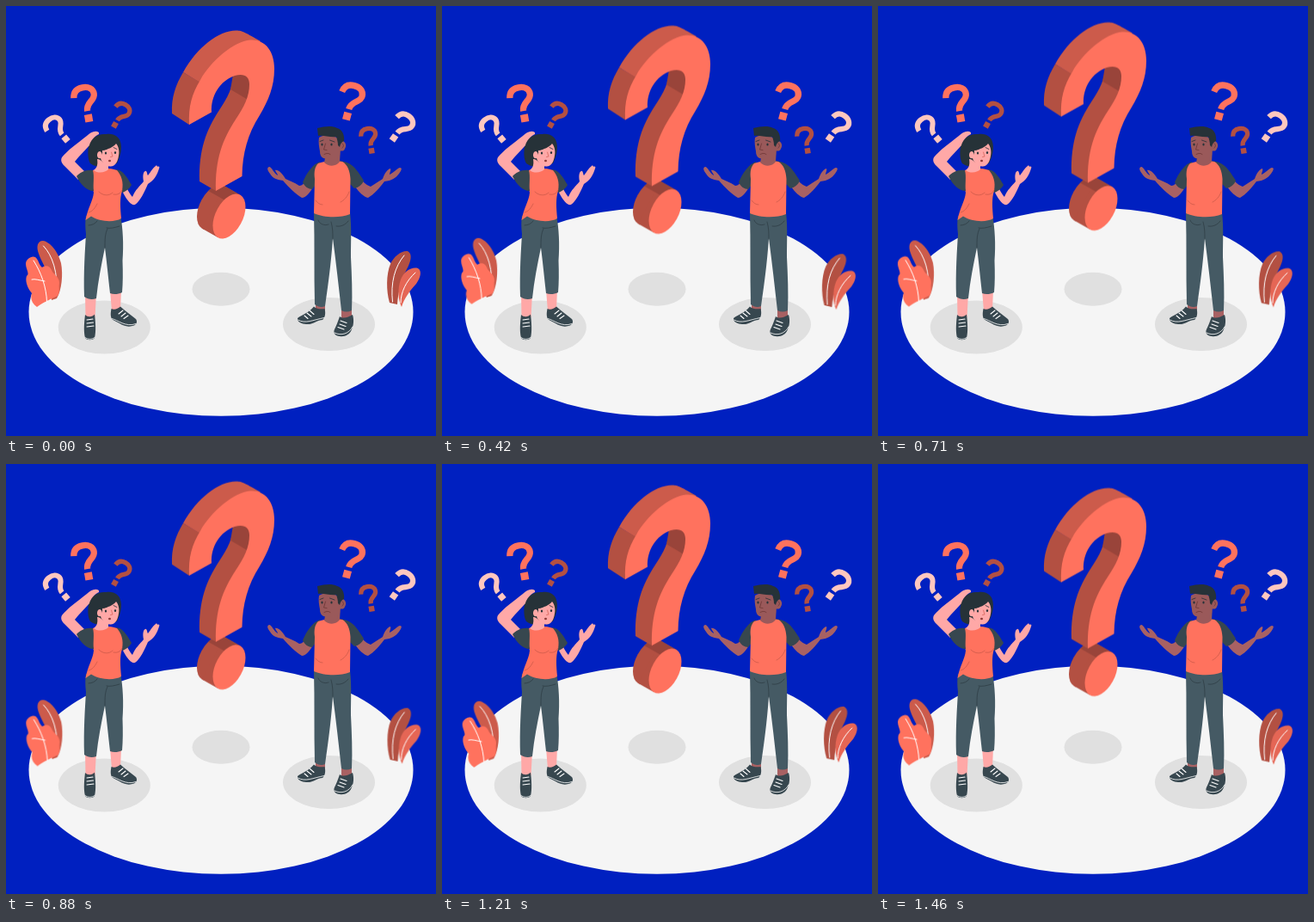
An HTML page for the animation above (1.5 s loop, 500 by 500 pixels).

```html
<!DOCTYPE html>
<html lang="en">
<head>
<meta charset="utf-8">
<title>Questions</title>
<style>
  html, body { margin: 0; width: 100%; height: 100%; overflow: hidden; background: #0020c0; }
  svg { display: block; width: 100vw; height: 100vh; }
  .float { animation: float 1.5s linear infinite; }
  .wind { transform-origin: 250px 250px; animation: wind 1.5s linear infinite; }
  @keyframes float { 50% { transform: translateY(-10px); } }
  @keyframes wind {
    0%, 100% { transform: rotate(0deg); }
    25% { transform: rotate(1deg); }
    75% { transform: rotate(-1deg); }
  }
  .coral { fill: #ff725e; color: #ff725e; }
  .mid { fill: #cc5b4b; }
  .side { fill: #b35042; color: #b35042; }
  .deep { fill: #99443a; }
  .pale { color: #ffc7bf; }
  .slate { fill: #455a64; }
  .steel { fill: #37474f; }
  .ink { fill: #263238; }
  .skin { fill: #ffa8a7; }
  .tan { fill: #a86163; }
  .face { fill: #9a595a; }
  .shade { fill: #e0e0e0; }
  .line { fill: none; stroke-width: .8; stroke-linecap: round; stroke-linejoin: round; }
  .vein { stroke: #fff; stroke-width: 1; }
  .lace { stroke: #fff; stroke-width: 1.1; }
  .fold { stroke: #2f3e46; }
  .crease { stroke: #cc5b4b; }
  .dark { stroke: #263238; }
</style>
</head>
<body>
<svg viewBox="0 0 500 500">
  <defs>
    <g id="mark">
      <path d="M-12-8C-11-15-7-18.5 0-18.5C7-18.5 12-15 12-9C12-1 1-1 1 9.5" fill="none" stroke="currentColor" stroke-width="7.3"/>
      <path d="M-3.5 13.5h9v8.8h-9z" fill="currentColor"/>
    </g>
    <circle id="disc" r="1" transform="matrix(19 -11 0 23.5 0 0)"/>
  </defs>

  <ellipse cx="250" cy="355.8" rx="223.5" ry="121" fill="#f5f5f5"/>
  <g class="shade">
    <ellipse cx="250" cy="329.3" rx="33.5" ry="19.5"/>
    <ellipse cx="114.3" cy="373.5" rx="53.5" ry="31"/>
    <ellipse cx="375.5" cy="370" rx="53.5" ry="31"/>
  </g>

  <!-- Plants -->
  <g class="wind">
    <path class="mid" d="M59 340C65 330 66.500 312 64 299C61 286 51 274 43 273C36.500 273 35 280 38 288C41 297 46 303 49 314C52 324 53 333 53 342Z"/>
    <path class="line vein" d="M43.500 279C54 290 61 310 58.500 336"/>
    <path class="coral" d="M36 350C30 346 28 340 30 334C25 328 22 320 24 314C28 311 23 306 23 300C23 294 30 290 34 292C38 295 38 301 42 304C46 301 51 302 53 307C55 313 62 314 62 322C61 328 63 332 60 337C52 341 42 345 36 350Z"/>
    <path class="line vein" d="M32 296C41 310 47 327 47.500 344M45 320C39 319 34 317 30 318"/>
    <path class="side" d="M446 345C442 331 442 312 447 300C451 291 460 284 467 285C473 288 471 297 466 306C460 318 456 332 455 347Z"/>
    <path class="line vein" d="M463 290C452 303 447 322 449.500 344"/>
    <path d="M460 350C456 342 455 329 459 318C463 308 472 303 479 305C484 308 482 316 477 323C469 332 463 340 460 350Z" fill="#e56655"/>
    <path class="line vein" d="M476 310C465 320 459 333 459 345"/>
  </g>

  <!-- Large mark -->
  <g class="float">
    <use href="#disc" class="side" x="241" y="234"/>
    <path class="side" d="M254 209.300L272.400 219.800L246.600 269.200L228 258.700Z"/>
    <path class="deep" d="M235.300 214.900Q243 206.500 254 209.300L272.400 219.800L253.800 225.400Z"/>
    <use href="#disc" class="coral" x="259.500" y="244.500"/>
    <path class="side" d="M244 215L225 204C224 167 233 144 248 121C258 106 264 94 264 80L272 77L285 84L285 102L279 117C262 145 247 167 244 215Z"/>
    <path class="deep" d="M261 97L264 80L272 77L286 82L285 98L280.500 108.500Z"/>
    <path class="mid" d="M206 77C222 48 248 28 268 28.500C275 28.500 279 31.500 296 41L270 62L225 89Z"/>
    <path class="side" d="M193 125C192 107 197 92 206 77L225.500 88.500L222 115L213 138Z"/>
    <path class="coral" d="M213 138C212 117 216 102 226 86C238 64 265 41 284 39.500C301 38.500 312 52 312 73C312 94 305 110 295 127C281 149 275 171 274.500 198L244 215C243 178 252 155 267 132C277 117 283 105 283 91C283 81 276 78 266 81C249 87 238 104 239 123.500Z"/>
  </g>

  <!-- Small marks -->
  <use href="#mark" class="coral" transform="translate(92 113) rotate(-10)"/>
  <use href="#mark" class="pale" transform="translate(59.500 144) rotate(-40) scale(.82)"/>
  <use href="#mark" class="side" transform="translate(132.200 126.500) rotate(29) scale(.73)"/>
  <use href="#mark" class="coral" transform="translate(400.200 110.500) rotate(15)"/>
  <use href="#mark" class="side" transform="translate(422.200 155.800) rotate(-10) scale(.72)"/>
  <use href="#mark" class="pale" transform="translate(459 140.500) rotate(35) scale(.85)"/>

  <!-- Woman -->
  <g>
    <path class="skin" d="M92 334H105L103.500 362H92.500ZM121 330H134L133 353L123 355Z"/>
    <path class="steel" d="M92 359C95 362 100 362 103 358.500C104 366 105 379 103 386C101 389 94 389 92 386C90 378 91 367 92 359ZM122.500 352C126 354 130 352 133 349.500C139 355 146 360 151 364C153 367 152 370 149 371.500C142 374 137 372 132 369C129 367 125 366 123 364C121 360 122 355 122.500 352Z"/>
    <path class="line lace" d="M94 365L101 364M94 369L101.500 368M94 373L102 372M131 358L136 354M134 361L139 357M137 363.500L142 360"/>
    <path class="line" stroke="#fff" d="M92 385.500C95 388 100 388 103 385.500M123 363.500C130 365 139 374 151 369.500"/>
    <path class="slate" d="M93 244L133 243C136 259 137 277 135.500 296C136 310 136 322 135 333C130 335.500 125 335.500 121 334C119 317 117 296 115 281C111 300 107 320 105 340C100 342 95 341 91 338C90 309 92 283 93 265C92 257 92 250 93 244Z"/>
    <path class="line fold" d="M132 256C126 258 120 259 117 258M118 259C115 265 115 272 115 281M106 250C104 253 100 255 96 255"/>

    <path class="skin" d="M139 209C142 215 145 220 147 222C150 214 156 209 160 204C159 199 159 193 162 192C164 191 164 196 165 197C168 193 171 188 174 186C175 185 176 186 176 187C178 186 179 187 178 189C176 196 172 203 165 207C161 216 156 227 150 231C146 232 142 228 136 217Z"/>
    <path class="steel" d="M128 190C136 191 140 198 146 208C144 212 139 216 135 217L129 204Z"/>
    <path class="coral" d="M101 191C108 188 121 188 129 191C134 197 137 204 135 215C132 224 133 235 134 247C126 252 109 251 99 244.500L92.500 249C95 235 101 227 102 217C100 209 98 198 101 191Z"/>
    <path class="line crease" d="M108 216C113 221 120 221 124 217M125 219C130 220 133 218 135 214M96 240C101 239 104 234 106 230"/>

    <path class="ink" d="M96 163C98 154 106 148 117 149C126 148 132 152 133.500 160C135 168 132 177 129 183L113 187C107 187 102 186 98 183C95 178 95 170 96 163Z"/>
    <path class="skin" d="M106 178C109 178 111 180 113 182L119 184L119 190C115 194 107 195 102 191C106 188 107 184 106 178Z"/>
    <path class="skin" d="M112 168C118 167 125 164 128 160C131 163 132 169 131 174C130 181 127 187 121 186.500C116 186 111 182 110 177C106 178 105 173 107 170C109 168 111 169 112 173Z"/>
    <path class="line dark" stroke-width="1.2" d="M113.500 167.500L117.500 166M125 164.500L129 166.500"/>
    <g class="ink">
      <ellipse cx="116" cy="171" rx="1.1" ry="1.5"/>
      <ellipse cx="127" cy="170.500" rx="1.100" ry="1.500"/>
    </g>
    <path class="line" stroke="#d6665e" d="M122.500 170L124 175L121.500 175.500"/>
    <ellipse cx="120.500" cy="180" rx="1.500" ry="1.300" fill="#8f3b38"/>

    <path class="skin" d="M108 147C104 144 98 147 94 151C85 158 70 169 65 176C63 180 65 183 68 186L84 202L91 192L80 181C85 174 92 168 97 162C98 157 103 151 108 149Z"/>
    <path class="steel" d="M82 198C86 194 92 190 101 191C103 198 101 207 102 215C94 215 87 208 82 198Z"/>
  </g>

  <!-- Man -->
  <g>
    <path class="tan" d="M360 342H371V356H360ZM390 350H402V364H390Z"/>
    <path class="steel" d="M358 349.500C362 353 367 352.500 370.500 352C372 357 371 363 368 365C362 365 357 371 349 370C344 370 338 367 339 363C344 359 352 357 358 349.500ZM388 361C392 364 398 362 403 359C405 365 404 372 402 376C400 382 394 385 388 384C383 384 380 380 382 376C384 372 386 367 388 361Z"/>
    <path class="line lace" d="M350 357L355 361M353.500 354.500L358 358.500M347 360L351 363.500M389 366L396 368.500M388 370L395 372.500M386 373.500L393 376"/>
    <path class="line" stroke="#fff" d="M339.500 365C348 370 357 365 370 362.500M382 380C390 384 399 381 403 373"/>
    <path class="slate" d="M358 240H400C402 257 401 274 401 292C402 313 403 334 402 354C398 356 394 356 390 354C387 328 384 300 380 270C378 300 374 328 371 349C367 351 363 350 359 347C358 311 359 275 358 240Z"/>
    <path class="line fold" d="M378 251C380 258 380 264 380 271M363 249C364 253 370 256 375 254M398 250C395 254 390 257 384 256"/>

    <path class="tan" d="M347 205C345 208 343 209 341 209C335 205 329 203 325 201C321 194 316 190 313 191C314 194 316 195 316 197C311 194 309 187 306 187C303 188 304 191 307 195C310 200 314 202 322 203C329 211 337 219 344 223C349 223 353 217 357 211Z"/>
    <path class="tan" d="M414 203C418 207 421 209 424 210C430 206 435 203 438 201C440 195 443 190 447 189C448 191 446 194 446 196C451 194 454 189 458 188C461 188 460 191 457 195C453 200 449 203 440 204C434 212 428 219 421 223C416 222 410 216 406 210Z"/>
    <path class="steel" d="M365 181C357 184 350 193 345 205C347 210 352 213 356 213L364 203ZM386 180C400 181 405 185 416 203C414 208 410 211 405 212L394 201Z"/>
    <path class="coral" d="M363 183C371 180 382 179 391 181C397 184 400 192 400.500 201L400 242C388 247 369 246 358 241L359 201C358 193 359 187 363 183Z"/>
    <path class="line crease" d="M399 216C397 222 393 226 389 228M360 226C362 229 365 231 368 231"/>

    <path class="face" d="M372 171L389 166L388 181C384 187 375 187 370 182Z"/>
    <path class="face" d="M364 153C371 149 382 150 389 156C394 157 397 161 394 166C393 169 390 169 388 168C387 174 382 178 376 178C369 178 365 176 365 169C364 164 363 158 364 153Z"/>
    <path class="ink" d="M362 142C371 140 379 139 385 142C390 143 394 149 393 157C390 158 389 160 388 164L386 162C386 158 385 155 384 152C377 153 369 150 363 151Z"/>
    <path class="line dark" stroke-width="1.200" d="M365 157.500L369 156M376.500 156L382 158"/>
    <g class="ink">
      <ellipse cx="367.500" cy="161" rx="1.100" ry="1.500"/>
      <ellipse cx="378.500" cy="161" rx="1.100" ry="1.500"/>
    </g>
    <path class="line" stroke="#6d3735" d="M371.500 160L369.500 167L373 167.500M370 172.500C373 171 375 171 377 172.500M391 160C393 161 393 163 391 165"/>
  </g>
</svg>
</body>
</html>
```
